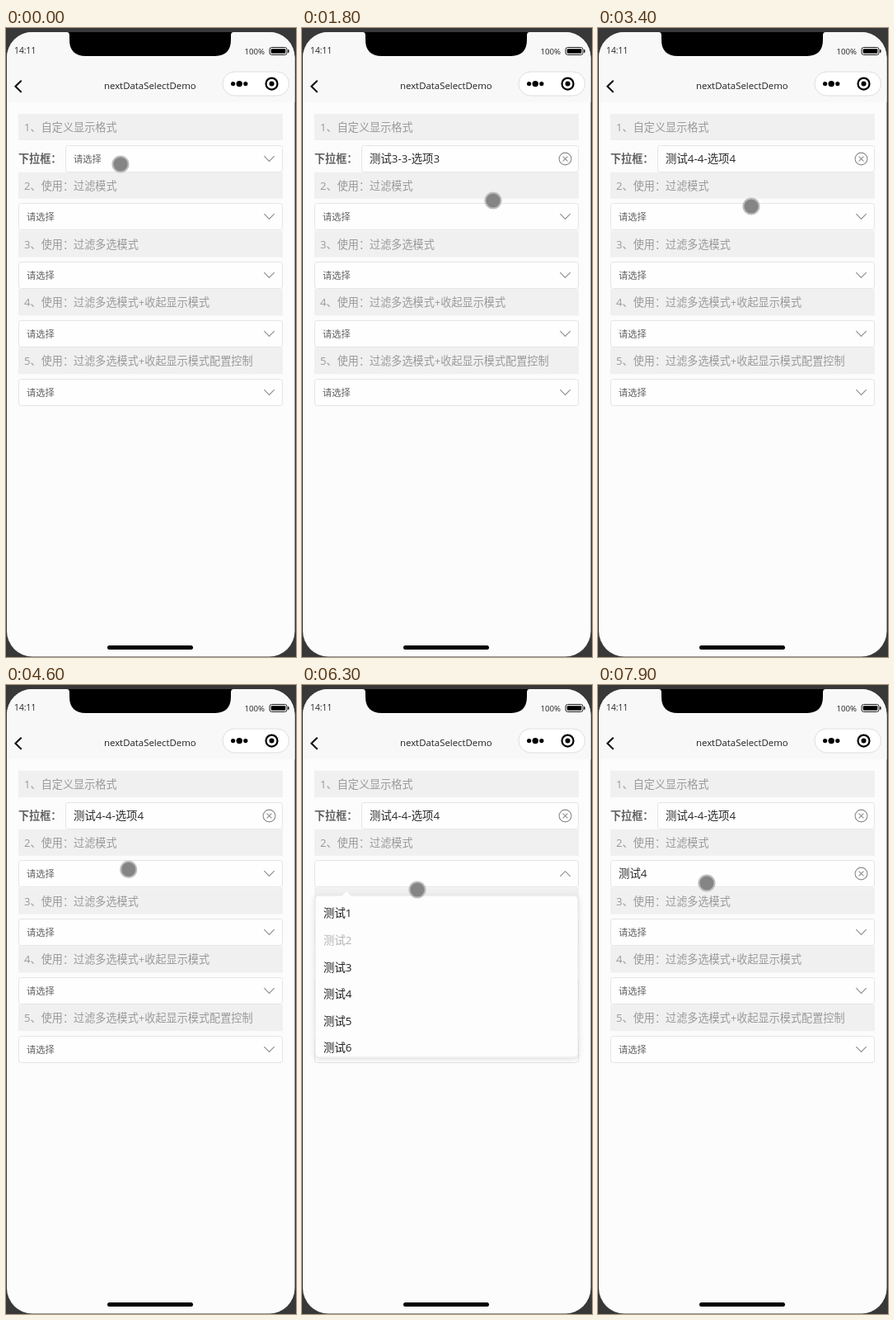
An HTML page for the animation above (8000 ms loop, 352 by 762 pixels).

```html
<!DOCTYPE html>
<html lang="zh-CN">
<head>
<meta charset="utf-8">
<title>nextDataSelectDemo</title>
<style>
  html, body { margin: 0; width: 100%; height: 100%; overflow: hidden; background: #383838; }
  svg { display: block; width: 352px; height: 762px; }
  text { font-family: "Open Sans", "Noto Sans CJK SC", "Noto Sans CJK", "Noto Sans CJK JP", sans-serif; }
  .line { fill: none; stroke: #8c8c8c; stroke-width: 1.1; }
</style>
</head>
<body>
<svg id="stage" viewBox="0 0 352 762" xmlns="http://www.w3.org/2000/svg"></svg>
<script>
const LOOP = 8000, STEP = 100;
const ROW = 70.8, ITEM = 32.6;
const stage = document.getElementById('stage');
const byId = id => document.getElementById(id);

const rect = (x, y, w, h, r, fill, extra = '') =>
  `<rect x="${x}" y="${y}" width="${w}" height="${h}" rx="${r}" fill="${fill}" ${extra}/>`;
const disc = (x, y, r, fill, extra = '') =>
  `<circle cx="${x}" cy="${y}" r="${r}" fill="${fill}" ${extra}/>`;
const label = (s, x, y, size, fill, extra = '') =>
  `<text x="${x}" y="${y}" font-size="${size}" fill="${fill}" ${extra}>${s}</text>`;

// Arrow down, arrow up and clear button of a select
const icons = (id, y) => `
  <path id="${id}-down" class="line" d="M313.3 ${y - 3.3}l6.2 6.2 6.2-6.2"/>
  <path id="${id}-up" class="line" d="M313.3 ${y + 3.4}l6.2-6.2 6.2 6.2"/>
  <g id="${id}-clear" class="line"><circle cx="319.5" cy="${y}" r="7.4"/>
  <path d="M316.6 ${y - 2.9}l5.8 5.8m0-5.8l-5.8 5.8"/></g>`;

const field = (id, x, y) =>
  rect(x + .5, y + .5, 336 - x - 1, 32, 3, '#fefefe', 'stroke="#e4e4e4"') +
  label('请选择', x + 10, y + 21, 11.3, '#666', `id="${id}-hint"`) +
  label('', x + 10, y + 21, 13.4, '#2b2b2b', `id="${id}-value"`) + icons(id, y + 16.5);

const popup = (id, x, y, tip, names) => `
  <g id="${id}">
    ${rect(x, y, 335 - x, 196, 4, '#fdfdfd', 'stroke="#e6e6e6" filter="url(#shade)"')}
    <path d="M${tip - 6} ${y + 1}l6-6 6 6z" fill="#fdfdfd"/>
    ${names.map((s, i) => label(s, x + 10, y + 26.3 + i * ITEM, 13.4, i === 1 ? '#b4b4b4' : '#1f1f1f')).join('')}
  </g>`;

const titles = ['自定义显示格式', '使用：过滤模式', '使用：过滤多选模式',
  '使用：过滤多选模式+收起显示模式', '使用：过滤多选模式+收起显示模式配置控制'];
const numbers = [1, 2, 3, 4, 5, 6];
const longNames = numbers.map(n => `测试${n}-${n}-选项${n}`);
const shortNames = numbers.map(n => `测试${n}`);

const rows = titles.map((s, i) => {
  const y = 104 + i * ROW;
  return rect(15, y, 321, 32, 0, '#f0f0f0') +
    label(`${i + 1}、${s}`, 22, y + 21, 13.14, '#999') +
    field('f' + (i + 1), i ? 15 : 72, Math.round(y + 37.6));
}).join('');

stage.innerHTML = `
  <defs><filter id="shade" x="-10%" y="-10%" width="120%" height="120%">
    <feDropShadow dx="0" dy="2" stdDeviation="3" flood-color="#000" flood-opacity=".12"/></filter>
    <clipPath id="screen"><rect x="1" y="5" width="349.5" height="756.5" rx="31"/></clipPath></defs>
  ${rect(0, 0, 352, 762, 0, '#383838')}
  <g clip-path="url(#screen)">
    ${rect(0, 0, 352, 762, 0, '#fcfcfc')}
    ${rect(0, 0, 352, 90, 0, '#f8f8f8')}
  </g>
  <path d="M74 5h202q-3 0-3 4v5q0 20-20 20H97q-20 0-20-20v-5q0-4-3-4z" fill="#000"/>
  ${label('14:11', 10, 31, 10.3, '#222')}
  ${label('100%', 289.5, 32, 9.7, '#222')}
  ${rect(320, 23.5, 21, 9, 2.5, 'none', 'stroke="#222"')}
  ${rect(321.7, 25.2, 17.6, 5.6, 1, '#000')}
  ${rect(342, 26, 1.6, 4, .8, '#222')}
  <path d="M18.7 63.7l-7.3 7.1 7.3 7.1" fill="none" stroke="#000" stroke-width="2"/>
  ${label('nextDataSelectDemo', 119, 73.5, 11.4, '#222')}
  ${rect(263, 53, 80.5, 29, 14.5, '#fff', 'stroke="#dedede"')}
  ${disc(275.6, 67.6, 2.6, '#000')}${disc(283.2, 67.6, 3.7, '#000')}${disc(290.8, 67.6, 2.6, '#000')}
  ${disc(322.5, 67.6, 7, 'none', 'stroke="#000" stroke-width="2.2"')}${disc(322.5, 67.6, 3, '#000')}
  ${rect(123, 748, 104, 5, 2.5, '#000')}
  ${label('下拉框：', 15, 163, 13.14, '#606060', 'font-weight="600"')}
  ${rows}
  ${rect(25, 221, 1, 16, 0, '#333', 'id="caret"')}
  ${popup('list1', 72.5, 184.5, 105, longNames)}
  ${rect(327.5, 193, 3.5, 128, 1.7, '#b8b8b8', 'id="bar"')}
  ${popup('list2', 16, 255, 54, shortNames)}
  <g id="pointer">${disc(0, 0, 9.6, '#858585', 'stroke="#bdbdbd" stroke-width="2"')}</g>`;

// Each gesture eases the pointer to a new resting place
const gestures = [
  { from: 0, to: 300, x: 144, y: 164 },
  { from: 700, to: 1300, x: 230, y: 271 },
  { from: 1600, to: 2000, x: 234, y: 147 },
  { from: 2100, to: 2600, x: 199, y: 299 },
  { from: 2900, to: 3550, x: 184, y: 203 },
  { from: 3600, to: 3700, x: 190, y: 201 },
  { from: 4400, to: 4650, x: 144, y: 226 },
  { from: 4650, to: 5000, x: 335, y: 245 },
  { from: 5000, to: 5350, x: 227, y: 246 },
  { from: 5500, to: 6300, x: 140, y: 248 },
  { from: 7000, to: 7300, x: 140, y: 386 },
  { from: 7400, to: 7900, x: 132, y: 240 }
];

function pointerAt(t) {
  let x = 139, y = 165;
  for (const g of gestures) {
    const k = Math.min(1, Math.max(0, (t - g.from) / (g.to - g.from)));
    const ease = k * k * (3 - 2 * k);
    x += (g.x - x) * ease;
    y += (g.y - y) * ease;
  }
  return [x, y];
}

const show = (id, on) => { byId(id).style.display = on ? '' : 'none'; };

function setField(id, hint, value, icon) {
  show(id + '-hint', hint);
  byId(id + '-value').textContent = value;
  for (const kind of ['down', 'up', 'clear']) show(`${id}-${kind}`, kind === icon);
}

function draw(t) {
  const within = (a, b) => t >= a && t < b;
  const firstOpen = within(600, 1600), again = within(2100, 2900), secondOpen = within(5800, 7500);
  const picked = t >= 2900 ? longNames[3] : within(1600, 2100) ? longNames[2] : '';
  const done = t >= 7500;
  const [x, y] = pointerAt(t);

  setField('f1', !picked, picked, t >= 1600 ? 'clear' : firstOpen ? 'up' : 'down');
  setField('f2', t < 5800, done ? shortNames[3] : '', done ? 'clear' : secondOpen ? 'up' : 'down');
  show('list1', firstOpen || again);
  show('bar', (firstOpen || again) && y > 184);
  show('list2', secondOpen);
  show('caret', within(6900, 7300));
  byId('pointer').setAttribute('transform', `translate(${x} ${y})`);
}

for (const id of ['f3', 'f4', 'f5']) setField(id, true, '', 'down');

const start = performance.now();
function frame() {
  const t = (performance.now() - start) % LOOP;
  draw(Math.floor(t / STEP) * STEP);
  requestAnimationFrame(frame);
}
draw(0);
requestAnimationFrame(frame);
</script>
</body>
</html>
```
